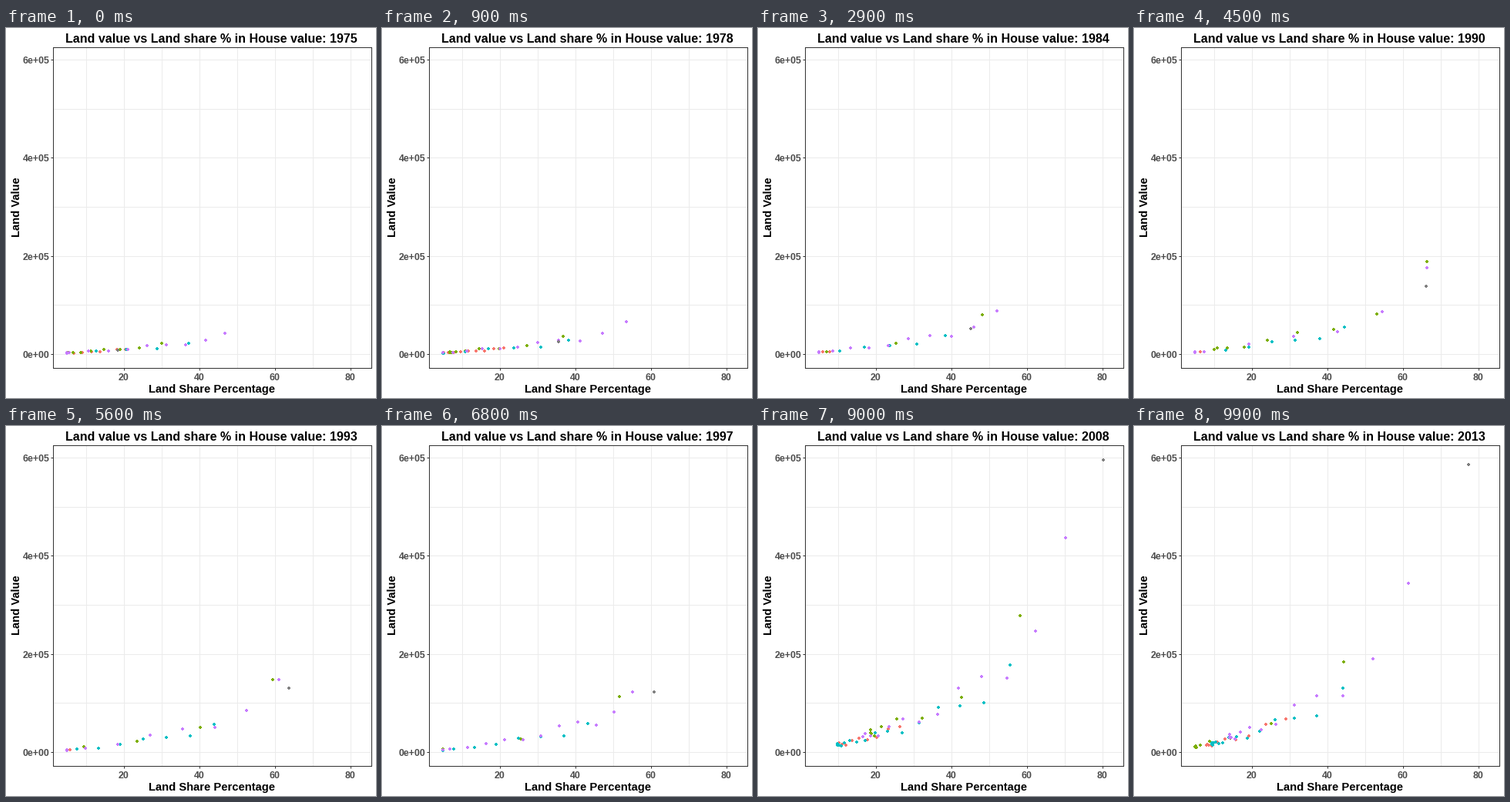
These frames come from a looping animation (480 by 480 pixels, 10000 ms). A matplotlib script:

```python
import matplotlib.pyplot as plt
import numpy as np
from matplotlib.animation import FuncAnimation

SIZE, DPI = 480, 72
FIRST_YEAR = 1975
LEFT, RIGHT, TOP, BOTTOM = 61, 474, 25, 441
X20, Y0 = 153, 423            # pixel of 20 % and of value 0
PX_SHARE, PX_VALUE = 4.9, 0.6365   # pixels per % and per thousand

plt.rcParams.update({"font.family": "Liberation Sans", "font.weight": "bold"})

# Market history: building cost (thousands) and how skewed the shares are.
YEARS = [1975, 1980.5, 1984.5, 1990, 1997.5, 2004, 2006, 2013]
COST = [38, 53, 64, 71, 79, 98, 134, 172]
SKEW = [1, 1.8, 1.3, 1, 1, 1.5, 1.5, 2.5]
MIN_SHARE = 4.9


class Region:
    """Cities spread between a lowest and a highest land share."""

    def __init__(self, color, count, price, skew, low, high):
        self.color, self.count = color, count
        self.skew, self.low, self.high = skew, low, high
        self.rank = np.linspace(0, 1, count)
        self.price = price * (1 + 0.2 * np.sin(1.7 * np.arange(count)))

    def cities(self, year):
        low, high, skew, cost = (np.interp(year, YEARS, path) for path in
                                 (self.low, self.high, SKEW, COST))
        share = low + (high - low) * self.rank ** (skew * self.skew)
        share = np.maximum(share, MIN_SHARE)
        value = cost * self.price * share / (100 - share)
        return np.column_stack([share, value])


TOP_CITY = [18.4, 49.8, 45.1, 66.1, 60.8, 79.6, 81.7, 77.3]
REGIONS = [
    Region("#F8766D", 10, 0.9, 1,
           [0, 8, -5, -20, -20, 10, 11, 8],
           [20.4, 21.6, 7.8, 6.3, 5, 22, 25, 29]),
    Region("#7CAE00", 9, 1.15, 2,
           [5, 8, -30, 10, -60, 24, 26, 5],
           [30, 42.5, 48.2, 66.3, 51.6, 64.1, 66, 44.3]),
    Region("#00BFC4", 16, 0.9, 1.3,
           [-60, 6, -30, -32, -30, 9, 10, 9.4],
           [37.1, 39.2, 38.4, 44.5, 43.3, 59.2, 62, 44.1]),
    Region("#C77CFF", 13, 1.05, 1,
           [-15, 13, -5, -75, -3, 15.5, 18, 14],
           [46.7, 59, 52, 66.3, 55.1, 74.5, 75, 61.4]),
    Region("#7F7F7F", 1, 1, 1, TOP_CITY, TOP_CITY),
]

fig = plt.figure(figsize=(SIZE / DPI, SIZE / DPI), dpi=DPI, facecolor="white")
ax = fig.add_axes([LEFT / SIZE, 1 - BOTTOM / SIZE,
                   (RIGHT - LEFT) / SIZE, (BOTTOM - TOP) / SIZE])
ax.set_xlim(20 + (LEFT - X20) / PX_SHARE, 20 + (RIGHT - X20) / PX_SHARE)
ax.set_ylim((Y0 - BOTTOM) / PX_VALUE, (Y0 - TOP) / PX_VALUE)
ax.set_xticks(range(20, 81, 20), labels=[])
ax.set_yticks(range(0, 601, 200), labels=[])
ax.set_xticks(range(10, 81, 20), minor=True)
ax.set_yticks(range(100, 601, 200), minor=True)
ax.tick_params(which="major", length=3, width=1, color="#333333")
ax.tick_params(which="minor", length=0)
ax.grid(which="both", color="#EBEBEB", linewidth=1)
ax.set_axisbelow(True)
for spine in ax.spines.values():
    spine.set(color="#333333", linewidth=1)


def label(x, y, text, size, color="black", ha="center", va="baseline", **kw):
    """Place text in pixels from the top left."""
    return fig.text(x / SIZE, 1 - y / SIZE, text, fontsize=size, color=color,
                    ha=ha, va=va, **kw)


for share in range(20, 81, 20):
    label(X20 - 0.3 + PX_SHARE * (share - 20), 457, str(share), 12.4,
          "#4D4D4D")
for value in range(0, 601, 200):
    text = f"{value // 100}e+05" if value else "0e+00"
    label(56.3, 428 - PX_VALUE * value, text, 12.4, "#4D4D4D", ha="right")
label(266.7, 473, "Land Share Percentage", 14.75)
label(21, 232, "Land Value", 14.75, rotation=90, ha="right", va="center")
title = label(266.5, 19, "", 16.05)

# A four pixel dot without its corners.
DOT = [(2, -1), (2, 1), (1, 1), (1, 2), (-1, 2), (-1, 1),
       (-2, 1), (-2, -1), (-1, -1), (-1, -2), (1, -2), (1, -1), (2, -1)]
colors = [r.color for r in REGIONS for _ in range(r.count)]
dots = ax.scatter(np.zeros(len(colors)), np.zeros(len(colors)), s=16,
                  marker=DOT, c=colors, linewidths=0, transform=None, zorder=3)


def half_years(frame):
    """Each year holds for two frames, later for one, with one frame between."""
    if frame < 68:
        return frame // 3 * 2 + (frame % 3 == 2)
    return frame - 23


def update(frame):
    year = FIRST_YEAR + half_years(frame) / 2
    cities = np.vstack([r.cities(year) for r in REGIONS])
    dots.set_offsets(np.round(ax.transData.transform(cities)))
    title.set_text(f"Land value vs Land share % in House value: {int(year)}")
    return dots, title


anim = FuncAnimation(fig, update, frames=100, interval=100, repeat=True,
                     repeat_delay=0, blit=False)
plt.show()
```
